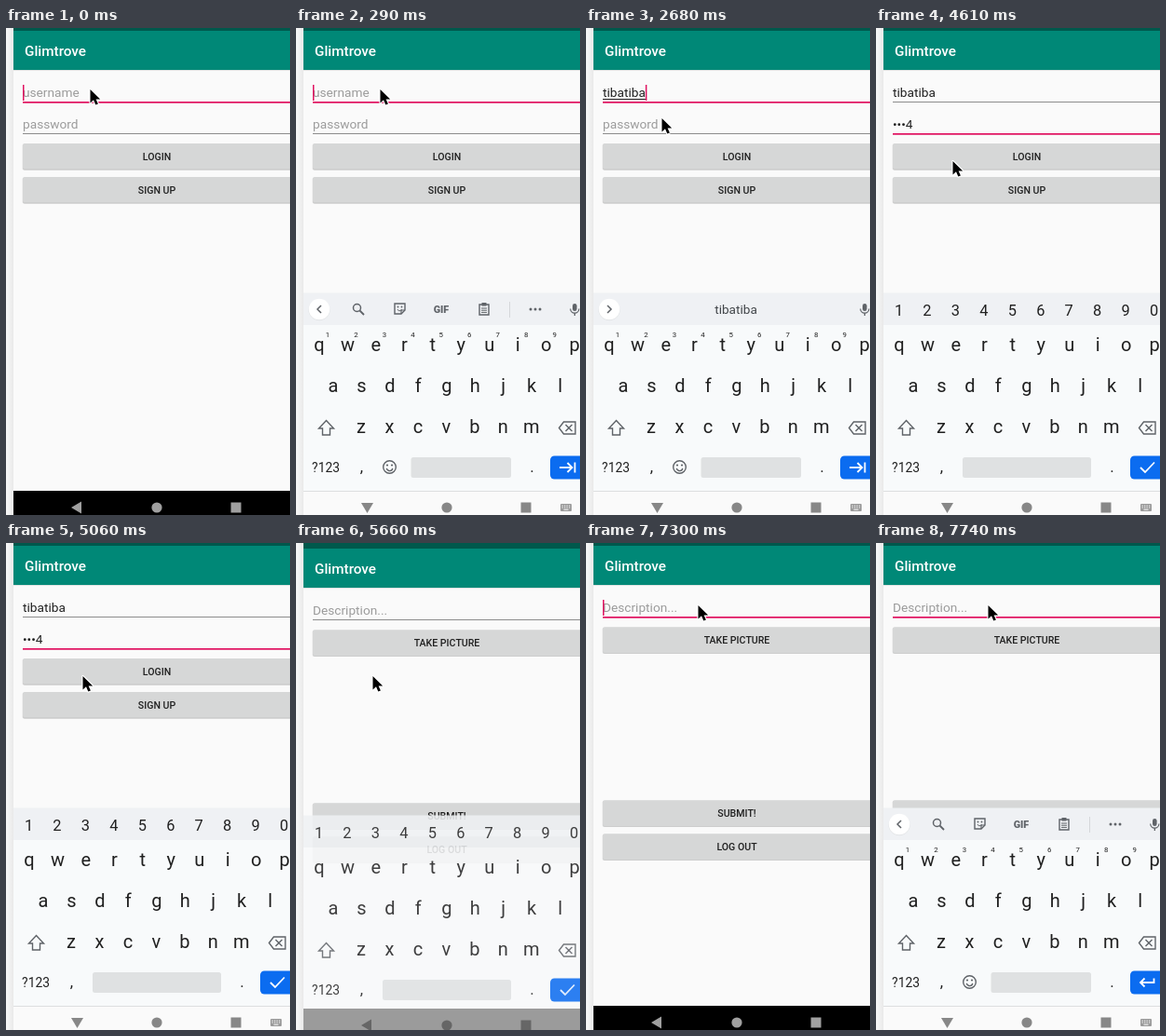
Animation of 305 by 523 pixels, one loop 8000 ms. Source, as an HTML page with a canvas:

```html
<!DOCTYPE html>
<html lang="en">
<head>
<meta charset="utf-8">
<title>Login demo</title>
<style>
html, body { margin: 0; width: 100%; height: 100%; overflow: hidden; background: #fafafa; }
canvas { display: block; width: 305px; height: 523px; }
</style>
</head>
<body>
<canvas id="stage" width="305" height="523"></canvas>
<script>
const ctx = document.getElementById('stage').getContext('2d');
const W = 305, H = 523, LOOP = 8000;
const PINK = '#e0105f', HINT = '#9b9b9b', INK = '#202020', ICON = '#5f6368';
const USER = 'tibatiba';

// Value of the last entry whose time has been reached.
function at(t, steps) {
  let value = steps[0][1];
  for (const [time, v] of steps) if (t >= time) value = v;
  return value;
}

function rect(x, y, w, h, color) {
  ctx.fillStyle = color;
  ctx.fillRect(x, y, w, h);
}

function rounded(x, y, w, h, r, color) {
  ctx.fillStyle = color;
  ctx.beginPath();
  ctx.roundRect(x, y, w, h, r);
  ctx.fill();
}

function text(str, x, y, size, color = INK, align = 'left', weight = 400) {
  ctx.font = `${weight} ${size}px Roboto, sans-serif`;
  ctx.fillStyle = color;
  ctx.textAlign = align;
  ctx.fillText(str, x, y);
  return ctx.measureText(str).width;
}

function path(points, close) {
  ctx.beginPath();
  points.forEach(([x, y]) => ctx.lineTo(x, y));
  if (close) ctx.closePath();
}

function line(points, color = ICON, width = 1.5, close = false) {
  path(points, close);
  ctx.strokeStyle = color;
  ctx.lineWidth = width;
  ctx.stroke();
}

function poly(points, color) {
  path(points, true);
  ctx.fillStyle = color;
  ctx.fill();
}

function disc(x, y, r, color) {
  ctx.beginPath();
  ctx.arc(x, y, r, 0, Math.PI * 2);
  ctx.fillStyle = color;
  ctx.fill();
}

function ring(x, y, r, color = ICON, width = 1.5, from = 0, to = Math.PI * 2) {
  ctx.beginPath();
  ctx.arc(x, y, r, from, to);
  ctx.strokeStyle = color;
  ctx.lineWidth = width;
  ctx.stroke();
}

function group(dy, alpha, draw) {
  ctx.save();
  ctx.translate(0, dy);
  ctx.globalAlpha = alpha;
  draw();
  ctx.restore();
}

function button(label, y, color = '#d6d7d7') {
  rounded(17.5, y + 0.5, 310, 28.3, 2, '#e4e4e4');
  rounded(18, y + 0.8, 310, 27.6, 2, '#c6c6c6');
  rounded(18, y, 310, 27.6, 2, color);
  text(label, 162, y + 17.8, 10.6, INK, 'center', 500);
}

// focus: 0 plain, 0.5 changing, 1 active
function field({ value = '', hint, base, focus = 0, caret = false, composing = false }) {
  const width = value ? text(value, 18, base, 13.7) : 0;
  if (!value) text(hint, 18, base, 13.7, HINT);
  if (composing && value) rect(18, base + 2, width, 1, INK);
  const y = base + 5;
  if (focus < 1) rect(18, y, W, 1, focus ? '#b8648a' : '#8c8c8c');
  else rect(18, y, W, 1.7, PINK);
  if (caret) rect(18 + width, base - 13, 1.5, 17, PINK);
}

function frame() {
  rect(8, -20, W, H + 40, '#fafafa');
  rect(8, 44, W, 2, '#dfe3e2');
  rect(8, 3, W, 42, '#008877');
  rect(8, -20, W, 23, '#00584c');
  text('Glimtrove', 20, 30, 15.3, '#fff', 'left', 500);
}

function loginScreen(t) {
  frame();
  const typed = at(t, [[0, 0], [890, 1], [1040, 2], [1340, 3], [1490, 4],
    [1790, 5], [1940, 6], [2090, 7], [2240, 8]]);
  const onUser = t < 2820;
  field({
    value: USER.slice(0, typed), hint: 'username', base: 74,
    focus: at(t, [[0, 1], [2820, 0.5], [2970, 0]]), caret: onUser, composing: onUser
  });
  field({
    value: at(t, [[0, ''], [3420, '1'], [3570, '•2'], [3720, '••3'], [4020, '•••4'], [5510, '••••']]),
    hint: 'password', base: 108,
    focus: at(t, [[0, 0], [2820, 0.5], [2970, 1]]), caret: t >= 2970 && t < 4310
  });
  button('LOGIN', 124, at(t, [[0, '#d6d7d7'], [4760, '#cbcccc'], [4910, '#c6c7c7'], [5060, '#d6d7d7']]));
  button('SIGN UP', 160);
}

function postScreen(t) {
  frame();
  field({
    hint: 'Description...', base: 74,
    focus: at(t, [[0, 0], [7150, 0.5], [7300, 1]]), caret: t >= 7300 && t < 7740
  });
  button('TAKE PICTURE', 90.3);
  button('SUBMIT!', 276.3);
  button('LOG OUT', 312.3);
}

function mic() {
  rounded(297, 296, 4.6, 8, 2.3, ICON);
  ring(299.3, 301.5, 4.6, ICON, 1.2, 0, Math.PI);
  rect(298.7, 306, 1.3, 3, ICON);
}

function chevron(dir) {
  disc(25, 302.6, 11.6, '#e2e4e6');
  disc(25, 302, 11.3, '#fff');
  line([[25 - 2 * dir, 298], [25 + 2 * dir, 302], [25 - 2 * dir, 306]]);
}

function tools() {
  chevron(-1);
  ring(65.5, 300.5, 4);
  line([[68.5, 303.5], [73, 308]], ICON, 1.8);
  line([[106, 296], [117, 296], [117, 303], [113, 307], [106, 307]], ICON, 1.4, true);
  line([[117, 303], [113, 303], [113, 307]], ICON, 1.2);
  disc(109.5, 299.5, 0.9, ICON);
  disc(113.5, 299.5, 0.9, ICON);
  ring(111.3, 301.5, 2.3, ICON, 1, 0.2, 2.9);
  text('GIF', 156, 306, 10.8, ICON, 'center', 900);
  line([[197, 297], [207, 297], [207, 308], [197, 308]], ICON, 1.4, true);
  rect(199.5, 295, 5, 3.5, ICON);
  for (const y of [300.5, 302.7, 304.9]) rect(199, y, 6, 1, ICON);
  rect(229, 294, 1, 17, '#d5d7da');
  for (const x of [252, 257, 262]) disc(x, 302, 1.5, ICON);
  mic();
}

function suggestions(words) {
  chevron(1);
  words.forEach((w, i) => text(w, 76 + 85 * i, 307, 13.6, '#42464a', 'center'));
  if (words[0]) for (const x of [116, 206]) rect(x, 294, 1, 17, '#d5d7da');
  mic();
}

function keyRow(letters, x0, base, size = 20) {
  [...letters].forEach((c, i) => text(c, x0 + 30.45 * i, base, size, INK, 'center'));
}

function actionKey(kind) {
  rounded(273, 459.5, 50, 25, 4.5, '#0b6cf0');
  const draw = (...pts) => line(pts, '#fff', 1.8);
  if (kind === 'done') draw([284, 472], [289, 477], [299, 466.5]);
  if (kind === 'next') {
    draw([283, 472], [296, 472]);
    draw([291.5, 467], [296.5, 472], [291.5, 477]);
    draw([299.5, 466.5], [299.5, 477.5]);
  }
  if (kind === 'enter') {
    draw([298.5, 467.5], [298.5, 472], [284, 472]);
    draw([288.5, 467.5], [284, 472], [288.5, 476.5]);
  }
}

function keyboard(strip, kind) {
  const secret = kind === 'done';
  rect(8, 284.5, W, 34.5, '#eff1f4');
  rect(8, 319, W, 190, '#f8fafb');
  if (strip === 'tools') tools();
  else if (strip === 'digits') keyRow('1234567890', 24.5, 308.5, 16.4);
  else suggestions(strip);

  keyRow('qwertyuiop', 25, 347);
  keyRow('asdfghjkl', 40, 391);
  keyRow('zxcvbnm', 70, 435);
  if (!secret) keyRow('1234567890', 34, 332, 7.8);

  line([[32.5, 421.5], [40.5, 430], [36.5, 430], [36.5, 437], [28.5, 437], [28.5, 430], [24.5, 430]], ICON, 1.4, true);
  line([[282.5, 429.5], [287.5, 423], [300, 423], [300, 436], [287.5, 436]], ICON, 1.4, true);
  line([[289.5, 426], [296.5, 433]], ICON, 1.4);
  line([[296.5, 426], [289.5, 433]], ICON, 1.4);

  text('?123', 32, 477, 13.8, INK, 'center');
  text(',', 70.5, 477, 17, INK, 'center');
  text('.', 253.5, 477, 17, INK, 'center');
  if (!secret) {
    ring(100.5, 471.5, 6.8, ICON, 1.4);
    disc(98, 469.5, 1.1, ICON);
    disc(103, 469.5, 1.1, ICON);
    ring(100.5, 472.3, 3.3, ICON, 1.4, 0.2, Math.PI - 0.2);
  }
  const left = secret ? 93 : 123.5;
  rounded(left, 461, 231 - left, 22, 2.5, '#dfe1e2');
  actionKey(kind);
}

// light: 0 black bar, 1 pale bar under the keyboard
function navBar(light) {
  const g = Math.round(light * 250);
  const color = light > 0 && light < 1 ? '#666' : light ? '#878787' : '#a0a0a0';
  rect(8, 497, W, 40, `rgb(${g},${g},${g})`);
  if (light === 1) {
    rect(8, 497, W, 1, '#dddfe0');
    poly([[70, 510], [83, 510], [76.5, 521]], color);
    rounded(284, 511, 12, 8, 1, '#9a9a9a');
    for (let i = 0; i < 8; i++) rect(285.5 + (i % 4) * 2.5, 512.5 + (i >> 2) * 2, 1.3, 1, '#fafafa');
    rect(287.5, 516.7, 5, 1, '#fafafa');
  } else {
    poly([[70, 515], [81, 508.5], [81, 521.5]], color);
  }
  disc(162, 515, 5.6, color);
  rect(241.5, 509.5, 11, 11, color);
}

function pointer([x, y]) {
  ctx.save();
  ctx.translate(x, y);
  const shape = [[0.5, 0], [0.5, 14.5], [4, 11.3], [6.3, 16.6], [8.9, 15.5], [6.6, 10.4], [11.2, 10.4]];
  ctx.lineJoin = 'round';
  line(shape, '#fff', 2.2, true);
  poly(shape, '#000');
  ctx.restore();
}

function leftMargin() {
  const fade = ctx.createLinearGradient(0, 0, 8, 0);
  fade.addColorStop(0, '#f8f8f8');
  fade.addColorStop(1, '#e9e9e9');
  rect(0, 0, 8, H, fade);
}

const HIDDEN = { dy: 0, alpha: 0, light: 0 };
const SHOWN = { dy: 0, alpha: 1, light: 1 };

function render(t) {
  ctx.clearRect(0, 0, W, H);
  const shift = at(t, [[0, 0], [5510, 11], [5660, 3], [5810, 0]]);
  const kb = at(t, [
    [0, HIDDEN], [150, { dy: 8, alpha: 0.8, light: 0.6 }], [290, SHOWN],
    [5660, { dy: 8, alpha: 0.86, light: 0.62 }], [5810, HIDDEN],
    [7450, { dy: 14, alpha: 0.55, light: 0.4 }], [7590, { dy: 3, alpha: 0.93, light: 0.85 }], [7740, SHOWN]
  ]);
  const strip = at(t, [
    [0, 'tools'], [890, ['t', 'the', 'to']], [1040, ['ti', 'time', 'tip']],
    [1340, ['tib', 'tie', 'tub']], [1490, ['tip', USER, 'kid']],
    [1790, ['tibat', USER, 'tibia']], [2090, ['', USER, '']], [2820, ['', '', '']],
    [2970, 'digits'], [5810, 'tools']
  ]);
  const kind = at(t, [[0, 'next'], [2970, 'done'], [5810, 'enter']]);

  if (t < 5660) loginScreen(t);
  if (t >= 5510) group(shift, t < 5660 ? 0.5 : 1, () => postScreen(t));
  if (kb.alpha) group(kb.dy, kb.alpha, () => keyboard(strip, kind));
  group(t >= 5660 ? shift : 0, 1, () => navBar(kb.light));
  leftMargin();
  pointer(at(t, [
    [0, [90, 66]], [2390, [88, 75]], [2540, [83, 91]], [2680, [81, 97]],
    [4170, [81, 105]], [4310, [82, 122]], [4460, [82, 138]], [4610, [82, 143]],
    [6410, [108, 125]], [6560, [115, 103]], [6710, [119, 83]], [6850, [120, 71]], [7000, [120, 67]]
  ]));
}

function tick() {
  render(performance.now() % LOOP);
  requestAnimationFrame(tick);
}
tick();
</script>
</body>
</html>
```
